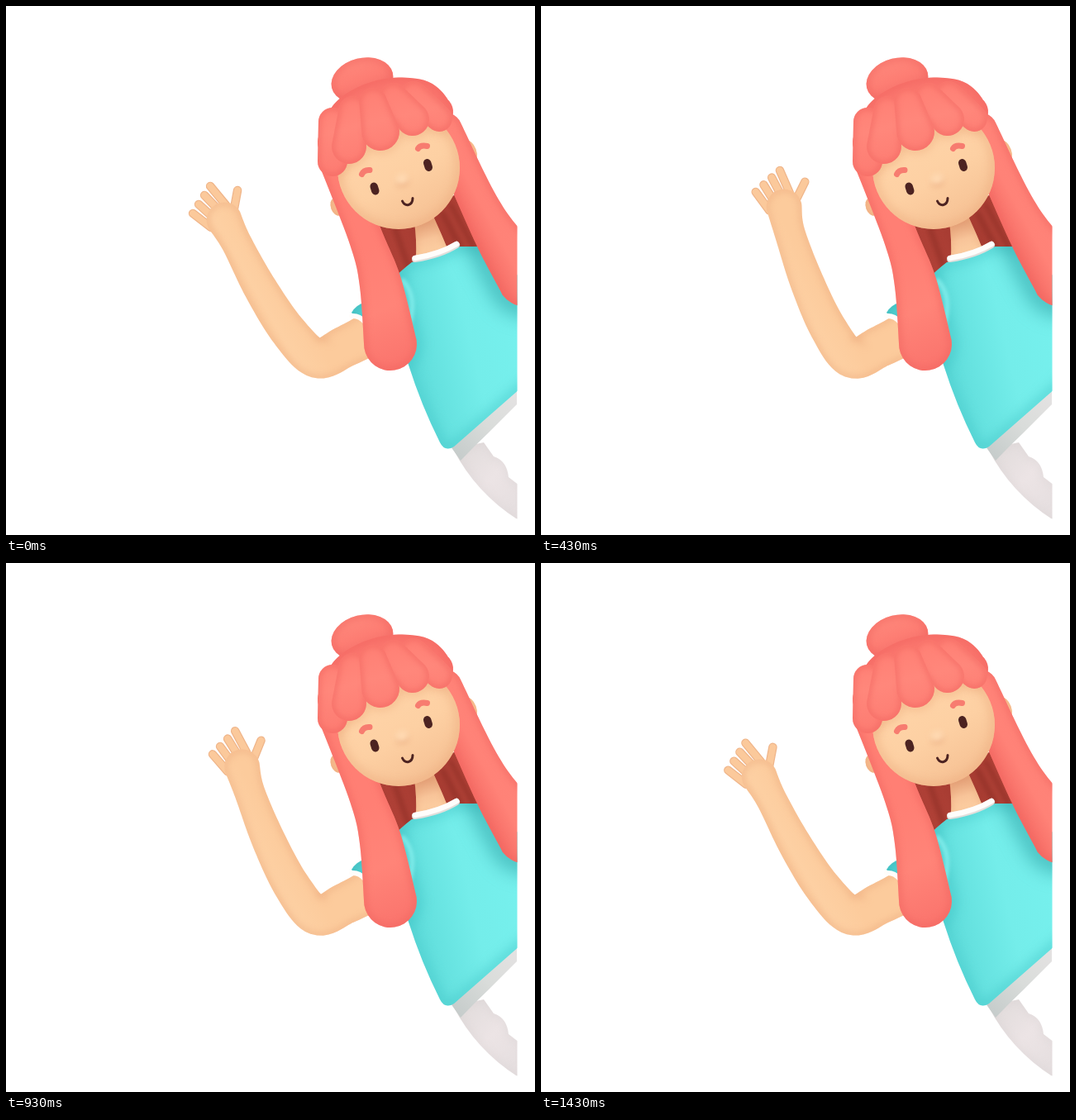
An HTML page with a canvas that plays this animation: 640 by 640 pixels, repeating every 1.5 s.

```html
<!DOCTYPE html>
<html lang="en">
<head>
<meta charset="utf-8">
<title>Waving girl</title>
<style>
html, body { margin: 0; width: 100%; height: 100%; overflow: hidden; background: #fff; }
canvas { display: block; width: 640px; height: 640px; }
</style>
</head>
<body>
<canvas id="stage" width="640" height="640"></canvas>
<script>
const ctx = document.getElementById('stage').getContext('2d');
const LOOP = 1500, STEPS = 21;

const HAIR = '#ff8277', HAIR_SHADE = '#f0655f', SKIN = '#fdd0a3', SKIN_SHADE = '#eba97c';
const TEAL_SHADE = '#41c4c5', INK = '#4c2321';

const { PI, cos, sin, min, abs, floor, round } = Math;
const rad = deg => deg * PI / 180;

// Point on a smooth curve through [x, y, radius] knots
function along(knots, u) {
  const last = knots.length - 1;
  const i = min(floor(u), last - 1), t = u - i;
  const knot = j => knots[Math.max(0, min(last, j))];
  const [a, b, c, d] = [knot(i - 1), knot(i), knot(i + 1), knot(i + 2)];
  return b.map((v, k) => v + t / 2 * (c[k] - a[k]
    + t * (2 * a[k] - 5 * v + 4 * c[k] - d[k] + t * (3 * (v - c[k]) + d[k] - a[k]))));
}

// Round-ended tube of varying radius
function tube(...knots) {
  const path = new Path2D(), back = [], n = knots.length - 1, ds = .01;
  const rim = ([x, y, r], a) => path.lineTo(x + r * cos(a), y + r * sin(a));
  for (let s = 0; s <= n * 12; s++) {
    const u = s / 12, p = along(knots, u);
    const [x0, y0] = along(knots, Math.max(0, u - ds)), [x1, y1] = along(knots, min(n, u + ds));
    const dir = Math.atan2(y1 - y0, x1 - x0);
    rim(p, dir - PI / 2);
    back.unshift([p, dir + PI / 2]);
  }
  const cap = ([[x, y, r], a], turn) => path.arc(x, y, r, a + turn, a + turn + PI);
  cap(back[0], -PI);
  back.forEach(b => rim(...b));
  cap(back[back.length - 1], 0);
  path.closePath();
  return path;
}

function oval(x, y, rx, ry, deg = 0) {
  const path = new Path2D();
  path.ellipse(x, y, rx, ry, rad(deg), 0, 2 * PI);
  return path;
}

function spin([x, y, ...rest], [cx, cy], deg) {
  const c = cos(rad(deg)), s = sin(rad(deg)), dx = x - cx, dy = y - cy;
  return [cx + dx * c - dy * s, cy + dx * s + dy * c, ...rest];
}

function fade(x0, y0, x1, y1, ...colors) {
  const g = ctx.createLinearGradient(x0, y0, x1, y1);
  colors.forEach((c, i) => g.addColorStop(i / (colors.length - 1), c));
  return g;
}

function soft(path, color, width, blur, alpha = 1) {
  ctx.save();
  ctx.filter = `blur(${blur}px)`;
  ctx.globalAlpha = alpha;
  ctx.strokeStyle = color;
  ctx.lineWidth = width;
  ctx.stroke(path);
  ctx.restore();
}

// Filled shape with a soft darker rim, plus optional detail inside it
function solid(path, fill, rim, width = 6, blur = 4, alpha = .75, inside) {
  ctx.fillStyle = fill;
  ctx.fill(path);
  ctx.save();
  ctx.clip(path);
  soft(path, rim, width, blur, alpha);
  if (inside) inside();
  ctx.restore();
}

function line(d, color, width) {
  ctx.strokeStyle = color;
  ctx.lineWidth = width;
  ctx.stroke(new Path2D(d));
}

const face = oval(475, 196, 74, 74);
const leftLock = tube([398, 186, 20], [436, 282, 21], [453, 335, 25.5], [465, 409, 32]);
const rightLock = tube([531, 150, 21], [570, 235, 23], [598, 285, 28], [630, 327, 37]);
const cap = tube([398, 165, 21], [415, 130, 21], [455, 110, 21], [500, 111, 22], [521, 128, 20]);
const shirt = new Path2D('M491 310Q525 305 549 291H572Q600 300 640 350V447L542 533Q531 540 525 528Q502 482 487 434L455 350Q465 330 491 310Z');

// Fringe locks fan out from an arc along the crown; the middle one lies on top
const tips = [[395, 188, 18], [415, 170, 21], [453, 152, 23], [492, 137, 20], [524, 136, 16]];
const fringe = [0, 1, 4, 3, 2].map(i => tube([395 + 24.5 * i, 140 - 16 * i + 2 * i * i, 17], tips[i]));

function torso() {
  const back = new Path2D('M450 262L545 228Q566 262 578 300L474 328Z');
  solid(back, fade(460, 300, 565, 250, '#b5443a', '#a2392f', '#b8463b'), '#8c2f26', 4, 4, .5, () =>
    soft(new Path2D('M470 268L487 316M528 250L550 292M538 240L566 292'), '#7f271f', 5, 3, .6));
  solid(new Path2D('M494 262Q497 282 496 306L536 298Q527 276 516 252Z'),
    fade(503, 264, 514, 302, '#e4a077', '#f8c499', SKIN), SKIN_SHADE, 4, 3, .6);

  solid(new Path2D('M541 536Q570 592 625 625V583L608 570Q606 550 590 545L578 528Z'),
    fade(550, 550, 615, 605, '#e3dddd', '#ece4e5', '#e6dfe0'), '#d3cdcd', 4, 4, .5);
  ctx.fillStyle = fade(542, 540, 618, 470, '#c6cccb', '#d9dcda', '#e4e2e2');
  ctx.fill(new Path2D('M538 533L618 463V482L584 516Q566 533 550 550Z'));

  solid(shirt, fade(495, 400, 618, 370, '#62dfdd', '#74edea', '#76f0ed'), TEAL_SHADE, 10, 7, .6, () => {
    soft(rightLock, '#2a9c9e', 24, 11, .6);
    soft(leftLock, TEAL_SHADE, 12, 7, .6);
    soft(new Path2D('M480 332Q498 352 488 384'), '#8cf3f1', 5, 2, .8);
  });
  line('M495 306Q526 301 545 289', '#e3dfdc', 8);
  line('M495 305Q525 300 545 288', '#fffdfb', 6.5);
}

function arm(k) {
  const elbow = [376, 426, 24];
  const swing = p => spin(p, elbow, 9.5 * k);
  const wrist = swing([279, 287, 18.5]);
  const hand = p => spin(swing(p), wrist, 8 * k);

  const finger = (tip, base) => {
    const d = `M${hand(tip)}L${hand(base)}`;
    line(d, '#efb58a', 10.5);
    line(d, '#fbc99b', 8);
  };
  finger([280, 223], [275, 250]);
  for (let i = 3; i >= 0; i--) finger([226 + 7 * i, 251 - 11 * i], [248 + 6 * i, 268 - 9 * i]);

  const limb = tube([446, 394, 26], [410, 412, 25], elbow,
    swing([342, 394, 22.5]), swing([308, 342, 20.5]), wrist, hand([264, 259, 21.5]));
  solid(limb, fade(285, 385, 345, 350, '#f9c494', SKIN, '#fccb9c'), SKIN_SHADE, 5, 4, .7);

  solid(new Path2D('M418 371Q424 361 434 359L446 390L434 384Z'), '#4fcdce', '#36b0b2', 4, 3, .6);
  line('M418 375Q427 374 434 382', '#fffdfb', 6);
}

function eye(x, y, open) {
  ctx.save();
  ctx.translate(x, y);
  ctx.rotate(rad(-17));
  ctx.scale(1, open);
  ctx.fillStyle = INK;
  ctx.beginPath();
  ctx.roundRect(-4.7, -7.5, 9.4, 15, 4.7);
  ctx.fill();
  ctx.restore();
}

function head(open) {
  const gloss = fade(440, 88, 465, 190, '#ff7d72', '#ff877b', '#fd7b71');
  solid(rightLock, fade(550, 260, 605, 230, '#f56b64', HAIR, '#ff8479'), HAIR_SHADE);
  solid(leftLock, fade(420, 300, 480, 440, '#ff7f74', '#ff8478', '#fa736c'), HAIR_SHADE);

  solid(face, fade(440, 150, 510, 270, '#ffd5a9', SKIN, '#f5bf92'), SKIN_SHADE, 9, 6, .6, () =>
    fringe.forEach(f => soft(f, SKIN_SHADE, 7, 5, .5)));
  ctx.save();
  ctx.filter = 'blur(3px)';
  ctx.fillStyle = '#f0b88c';
  ctx.fill(oval(480, 214, 8, 5, -15));
  ctx.fillStyle = '#ffd9b2';
  ctx.fill(oval(479, 209, 8, 6, -15));
  ctx.restore();

  line('M430.500 203.500Q433 198 440 198.500', '#f77c70', 7);
  line('M498.500 172.500Q501 168 509.500 169.500', '#f77c70', 7);
  eye(446, 221, open);
  eye(510.5, 192.5, open);
  line('M479.500 236Q482 241.500 487 240.500Q492 239 492 232.500', INK, 3);

  solid(oval(431, 90, 38, 27, -14), fade(420, 63, 440, 115, '#ff8a7d', '#fd7d73', '#f06a65'), HAIR_SHADE);
  solid(cap, '#fa756d', HAIR_SHADE);
  for (const f of fringe) solid(f, gloss, HAIR_SHADE, 5, 3.5);
}

// Two swings per loop: a quick rise and a slower, softer fall
function wave(t) {
  const rise = 315, fall = 435, p = (t + 10) % (rise + fall);
  if (p < rise) return (1 - cos(PI * p / rise)) / 2;
  const q = (p - rise) / fall;
  return q < .5 ? 1 - 4 * q ** 3 : 4 * (1 - q) ** 3;
}

const blink = t => min(1, abs(t - 1070) / 140);

function draw(t) {
  ctx.fillStyle = '#fff';
  ctx.fillRect(0, 0, 640, 640);
  ctx.save();
  ctx.beginPath();
  ctx.rect(0, 0, 618.5, 620.5);
  ctx.clip();
  ctx.lineCap = 'round';
  solid(oval(561, 176, 8, 14, -20), '#fbc394', SKIN_SHADE, 3, 2);
  solid(oval(400, 243, 7, 11, -20), '#f6b98c', SKIN_SHADE, 3, 2);
  torso();
  arm(wave(t));
  head(blink(t));
  ctx.restore();
}

// Poses are held: each step starts on a whole 10 ms
const start = step => round(step * LOOP / STEPS / 10) * 10;
let shown = -1;
function tick() {
  const t = performance.now() % LOOP;
  let step = STEPS - 1;
  while (start(step) > t) step--;
  if (step !== shown) draw(start(shown = step));
  requestAnimationFrame(tick);
}
tick();
</script>
</body>
</html>
```
